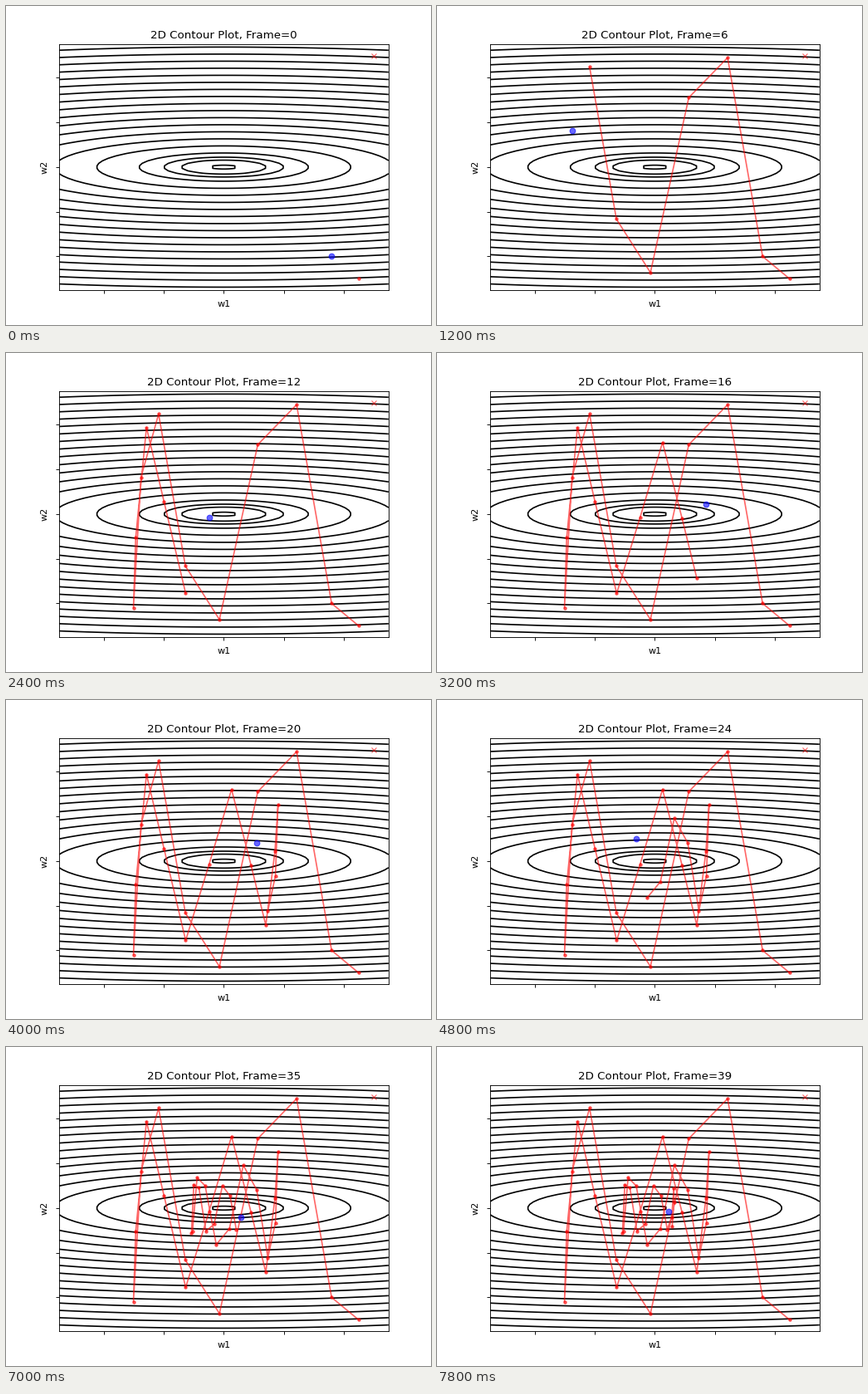
Animation of 512x384 px, one loop 8 s. Source, as a matplotlib script:

```python
import numpy as np
import matplotlib.pyplot as plt
from matplotlib.animation import FuncAnimation

FRAMES = 40
START = (5.0, 5.0)
RATE, MOMENTUM = 0.1, 0.9
LIMIT = 5.5


def loss(x, y):
    return 0.5 * x**2 + 10 * y**2


def descend(start, steps):
    """Gradient descent with momentum; returns every visited point."""
    w = np.array(start)
    v = np.zeros(2)
    path = [w]
    for _ in range(steps):
        v = MOMENTUM * v - RATE * w * (1, 20)
        w = w + v
        path.append(w)
    return np.array(path)


path = descend(START, FRAMES + 1)

fig, ax = plt.subplots(figsize=(6.4, 4.8), dpi=80)
grid = np.linspace(-LIMIT, LIMIT, 100)
X, Y = np.meshgrid(grid, grid)
levels = [0.1, 1, 2] + [k**2 for k in range(2, 18)]
ax.contour(X, Y, loss(X, Y), levels=levels, colors="black")

ax.plot(*START, "rx", alpha=0.6)
trail, = ax.plot([], [], "r.-", alpha=0.6)
head, = ax.plot([], [], "bo", alpha=0.6)

ticks = range(-4, 5, 2)
ax.set_xticks(ticks, [])
ax.set_yticks(ticks, [])
ax.set_xlim(-LIMIT, LIMIT)
ax.set_ylim(-LIMIT, LIMIT)
ax.set_xlabel("w1")
ax.set_ylabel("w2")
title = ax.set_title("")


def update(n):
    trail.set_data(*path[1:n + 2].T)
    head.set_data(*path[n + 2:n + 3].T) if n + 2 < len(path) else None
    title.set_text(f"2D Contour Plot, Frame={n}")
    return trail, head, title


anim = FuncAnimation(fig, update, frames=FRAMES, interval=200,
                     init_func=lambda: update(0), repeat=True)
plt.show()
```
